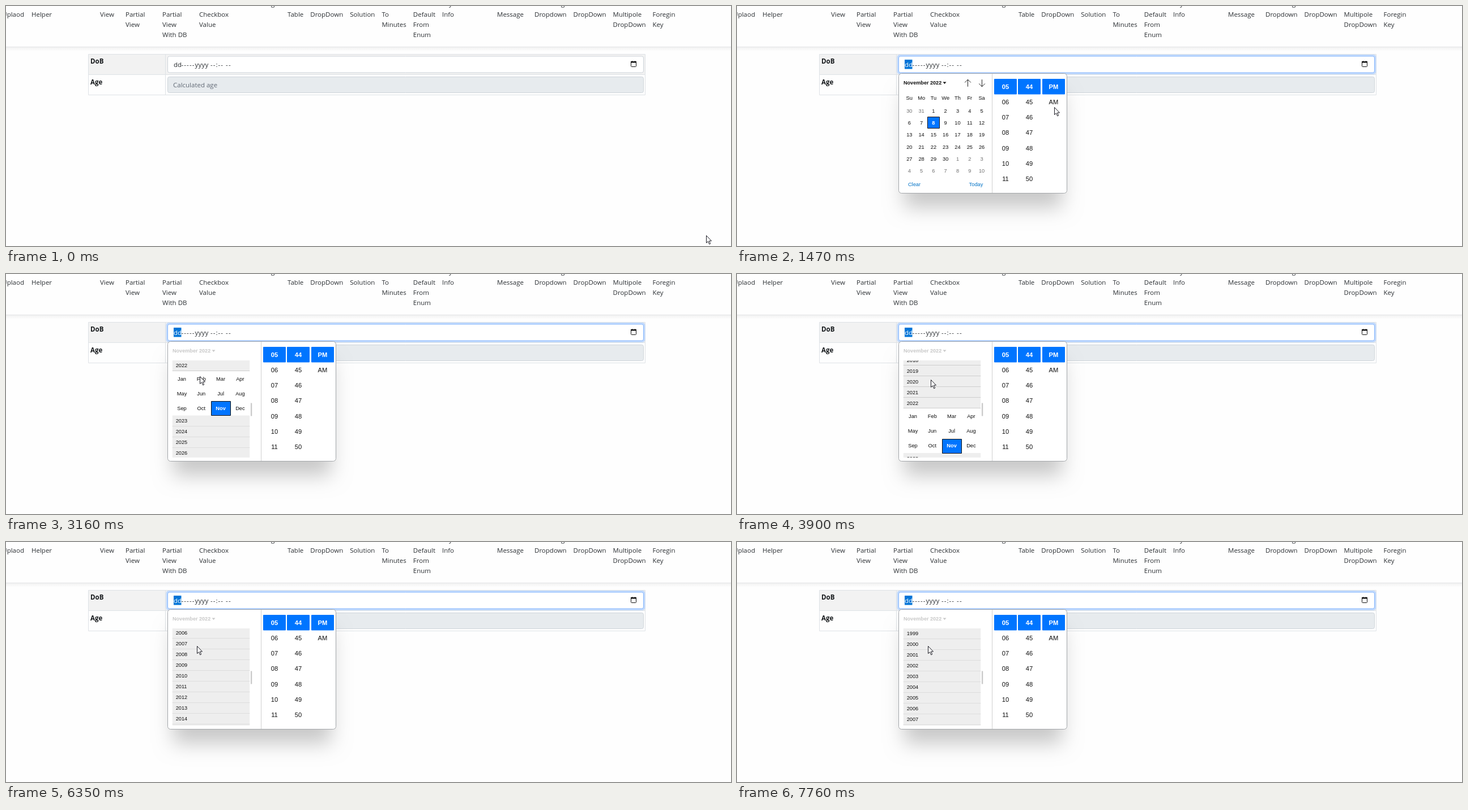
Recreate the animation shown at these times as an HTML page with a canvas. Size 1280x425 px, loop 8 s.

```html
<!DOCTYPE html>
<html lang="en">
<head>
<meta charset="utf-8">
<title>Age calculator</title>
<style>
html, body { margin: 0; width: 100%; height: 100%; overflow: hidden; background: #fefefe; }
canvas { display: block; }
</style>
</head>
<body>
<canvas id="stage" width="1280" height="425"></canvas>
<script>
const g = document.getElementById('stage').getContext('2d');
const LOOP = 8000, FOCUS = 740, POPUP = 800, CONTENT = 930, YEARS = 2550;
const UI = '"Open Sans", sans-serif', SANS = '"Liberation Sans", Arial, sans-serif';
const BLUE = '#0075ff', INK = '#101010', BODY = '#2b2f33', EDGE = '#dee2e6';

// Each leg runs from one time to another and ends at the given values.
const POINTER = [
  [60, 200, 1112, 94], [520, 600, 1110, 102], [960, 1610, 411, 200], [1610, 2210, 395, 136],
  [2210, 2410, 340, 134], [2620, 3230, 342, 187], [4050, 4700, 347, 187], [5440, 5700, 337, 184]
];
const SCROLL = [
  [3370, 4050, 85], [4180, 4510, 168], [4640, 5050, 268],
  [5440, 6130, 297], [6280, 6890, 349], [7020, 7430, 410], [7620, 7760, 437]
];

function follow(legs, pose, t) {
  for (const [from, to, ...target] of legs) {
    const p = Math.min(1, Math.max(0, (t - from) / (to - from)));
    pose = pose.map((v, i) => v + (target[i] - v) * p);
  }
  return pose;
}

function text(str, x, y, { font = '11.5px ' + UI, color = BODY, align = 'left', space = 0 } = {}) {
  g.font = font;
  g.fillStyle = color;
  g.textAlign = align;
  g.letterSpacing = space + 'px';
  g.fillText(str, x, y);
  return g.measureText(str).width;
}

function label(str, x, y, color = INK, bold = false, size = 9.3, align = 'center') {
  text(str, x, y + size * .36, { font: `${bold ? 'bold ' : ''}${size}px ${SANS}`, color, align });
}

function box(x, y, w, h, fill, stroke, radius = 0) {
  g.beginPath();
  g.roundRect(x, y, w, h, radius);
  if (fill) { g.fillStyle = fill; g.fill(); }
  if (stroke) { g.strokeStyle = stroke; g.lineWidth = 1; g.stroke(); }
}

function line(points, color, width = 1) {
  g.beginPath();
  points.forEach(([x, y]) => g.lineTo(x, y));
  g.strokeStyle = color;
  g.lineWidth = width;
  g.stroke();
}

function clipped(x, y, w, h, paint) {
  g.save();
  g.beginPath();
  g.rect(x, y, w, h);
  g.clip();
  paint();
  g.restore();
}

// Items in a run flow side by side; words of an item stack.
function navRun(x, items) {
  for (const item of items.split(', ')) {
    const widths = item.split('|').map((word, i) => text(word, x, 19 + i * 18));
    x += Math.max(...widths) + 12;
  }
}

function drawNav() {
  text('Uplaod', 32, 19, { align: 'right' });
  navRun(45, 'Helper');
  navRun(166, 'View');
  navRun(211, 'Partial|View');
  navRun(276, 'Partial|View|With DB');
  navRun(341, 'Checkbox|Value');
  navRun(497, 'Table, DropDown, Solution, To|Minutes, Default|From|Enum, Info');
  navRun(867, 'Message');
  navRun(933, 'Dropdown, DropDown, Multipole|DropDown, Foregin|Key');
  text('g', 468, 0);
  text('y', 782, 0);
  text('g', 980, 0);
  const shade = g.createLinearGradient(0, 72, 0, 80);
  shade.addColorStop(0, '#f0f0f0');
  shade.addColorStop(1, '#fefefe');
  g.fillStyle = shade;
  g.fillRect(0, 72, 1280, 8);
  line([[0, 72.5], [1280, 72.5]], '#e2e4e6');
}

function drawAgeField() {
  box(285.5, 125.5, 840, 28, '#e7ebee', '#ced4da', 3);
  text('Calculated age', 295, 143.5, { color: '#626a76' });
}

function drawDateField(focused) {
  if (focused) box(282.5, 86, 846, 35, '#c2dafc', null, 5);
  box(285.5, 89, 840, 29, '#fff', focused ? '#86b7fe' : '#ced4da', 3);
  if (focused) box(296, 95, 13.5, 16.5, '#0075d7');
  text('dd', 296, 108, { color: focused ? '#fff' : BODY });
  text('-----', 309.5, 108, { space: 1.1 });
  text('yyyy', 333.5, 108, { space: .2 });
  text('--:--', 361, 108, { space: 1 });
  text('--', 388, 108, { space: 1.2 });
  box(1103.5, 98.5, 9, 9, null, INK, 1);
  box(1103, 98, 10, 2.5, INK);
  for (const x of [1105, 1110]) box(x, 97, 1, 1, INK);
}

function drawForm(focused) {
  box(145.5, 85.5, 983, 36, '#f2f2f2', EDGE);
  box(145.5, 121.5, 983, 36, null, EDGE);
  line([[281.5, 85], [281.5, 157]], EDGE);
  const bold = { font: 'bold 11.5px ' + UI, color: '#16191c' };
  text('DoB', 149, 102, bold);
  text('Age', 149, 138.5, bold);
  drawDateField(focused);
  drawAgeField();
}

function drawPopupFrame() {
  g.save();
  g.shadowColor = 'rgba(0,0,0,.21)';
  g.shadowBlur = 34;
  g.shadowOffsetY = 26;
  box(295, 130, 279, 201, '#fff', null, 5);
  g.restore();
  box(285.5, 119.5, 297, 212, '#fff', '#a3a6aa', 5);
}

function drawTimes() {
  line([[450.5, 120], [450.5, 331]], '#cfcfcf');
  const column = (x, values) => values.forEach((v, i) => {
    if (!i) box(x - 20, 129, 40, 27.5, BLUE, null, 1);
    label(v, x, 142.5 + i * 27.3, i ? INK : '#fff', !i, 11.2);
  });
  const run = first => Array.from({ length: 7 }, (_, i) => String(first + i).padStart(2, '0'));
  column(474, run(5));
  column(516, run(44));
  column(559, ['PM', 'AM']);
}

function drawTitle(color) {
  label('November 2022', 294, 136, color, true, 9.1, 'left');
  g.beginPath();
  [[363.5, 134.5], [369.5, 134.5], [366.5, 138]].forEach(p => g.lineTo(...p));
  g.fill();
}

function drawArrow(x, dir) {
  const tip = 136.5 + 6.3 * dir;
  line([[x, 136.5 - 6.3 * dir], [x, tip]], '#222');
  line([[x - 5.3, tip - 5.3 * dir], [x, tip], [x + 5.3, tip - 5.3 * dir]], '#222');
}

function drawMonth() {
  drawTitle(INK);
  drawArrow(407.5, -1);
  drawArrow(432.5, 1);
  const cellX = i => 304.3 + 21.3 * (i % 7);
  ['Su', 'Mo', 'Tu', 'We', 'Th', 'Fr', 'Sa'].forEach((d, i) => label(d, cellX(i), 163));
  box(336.5, 196.5, 21, 20, BLUE, INK);
  for (let i = 0; i < 42; i++) {
    const date = new Date(2022, 9, 30 + i), inside = date.getMonth() === 10;
    const today = inside && date.getDate() === 8;
    label(date.getDate(), cellX(i), 185.5 + 21.3 * Math.floor(i / 7),
      today ? '#fff' : inside ? INK : '#707070', today);
  }
  label('Clear', 313, 315.5, '#0072c6');
  label('Today', 422, 315.5, '#0072c6');
}

function drawYears(offset) {
  const current = 162 + offset;
  for (let year = 1996; year < 2032; year++) {
    const y = current + (year - 2022) * 19 + (year > 2022 ? 79 : 0);
    const rule = Math.round(y + 9) + .5;
    box(293.5, y - 9.5, 137, 19, '#eee');
    line([[293.5, rule], [430.5, rule]], '#cecece');
    label(year, 299.7, y, INK, false, 9.2, 'left');
  }
  'Jan Feb Mar Apr May Jun Jul Aug Sep Oct Nov Dec'.split(' ').forEach((name, i) => {
    const x = 310.5 + 34.3 * (i % 4), y = current + 23.7 + 26 * Math.floor(i / 4), on = name === 'Nov';
    if (on) box(Math.round(x - 17) + .5, Math.round(y - 12.5) + .5, 34, 25, BLUE, INK);
    label(name, x, y, on ? '#fff' : INK, on);
  });
}

function drawYearList(offset) {
  drawTitle('#c8c8c8');
  box(432, 228.5, 2.3, 23, '#cacaca');
  clipped(293.5, 153, 137, 172, () => drawYears(offset));
}

function drawPopup(t) {
  drawPopupFrame();
  if (t < CONTENT) return clipped(286, 120, 296, 211, drawAgeField);
  drawTimes();
  if (t < YEARS) drawMonth();
  else drawYearList(...follow(SCROLL, [0], t));
}

function drawPointer(x, y) {
  g.save();
  g.translate(Math.round(x) + .5, Math.round(y) + .5);
  const arrow = new Path2D('M0 0V13L3 10.3 5.2 15.3 7.2 14.4 5 9.5H9Z');
  g.fillStyle = '#fff';
  g.fill(arrow);
  g.strokeStyle = '#1c1c24';
  g.lineWidth = 1;
  g.stroke(arrow);
  g.restore();
}

function draw(t) {
  g.fillStyle = '#fefefe';
  g.fillRect(0, 0, 1280, 425);
  drawNav();
  drawForm(t >= FOCUS);
  if (t >= POPUP) drawPopup(t);
  drawPointer(...follow(POINTER, [1236, 406], t));
}

const start = performance.now();
(function tick() {
  draw((performance.now() - start) % LOOP);
  requestAnimationFrame(tick);
})();
</script>
</body>
</html>
```
